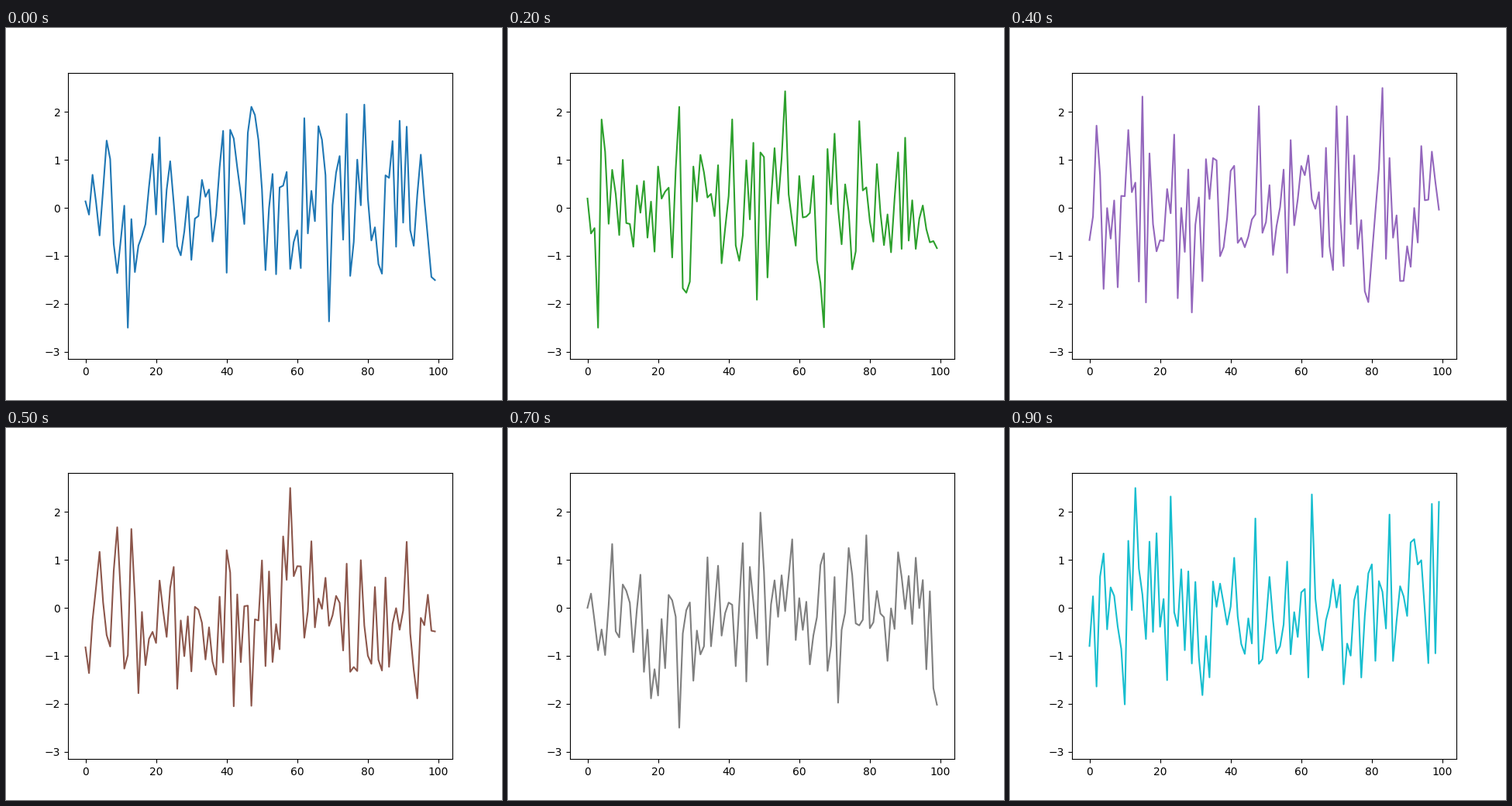
A matplotlib script that plays this animation: 640 px wide and 480 px high, repeating every 1000 ms.

```python
import numpy as np
import matplotlib.pyplot as plt
from matplotlib.animation import FuncAnimation

SAMPLES = 100
STEPS = 10
INTERVAL = 100  # ms
REACH = 2.5     # largest swing of every trace


def noise_trace(step):
    """Gaussian noise, repeatable per step, scaled to a common reach."""
    values = np.random.default_rng(step).standard_normal(SAMPLES)
    return values * REACH / np.abs(values).max()


fig, ax = plt.subplots(figsize=(6.4, 4.8), dpi=100)
ax.set_xlim(-4.95, 103.95)
ax.set_ylim(-3.155, 2.82)
ax.set_xticks(range(0, 101, 20))
ax.set_yticks(range(-3, 3))

line, = ax.plot(np.arange(SAMPLES), noise_trace(0), color="C0", lw=1.5)


def update(step):
    """Swap in a fresh trace in the next colour of the default cycle."""
    line.set_ydata(noise_trace(step))
    line.set_color(f"C{step}")
    return line,


anim = FuncAnimation(fig, update, frames=STEPS, interval=INTERVAL,
                     repeat=True, repeat_delay=0)
plt.show()
```
